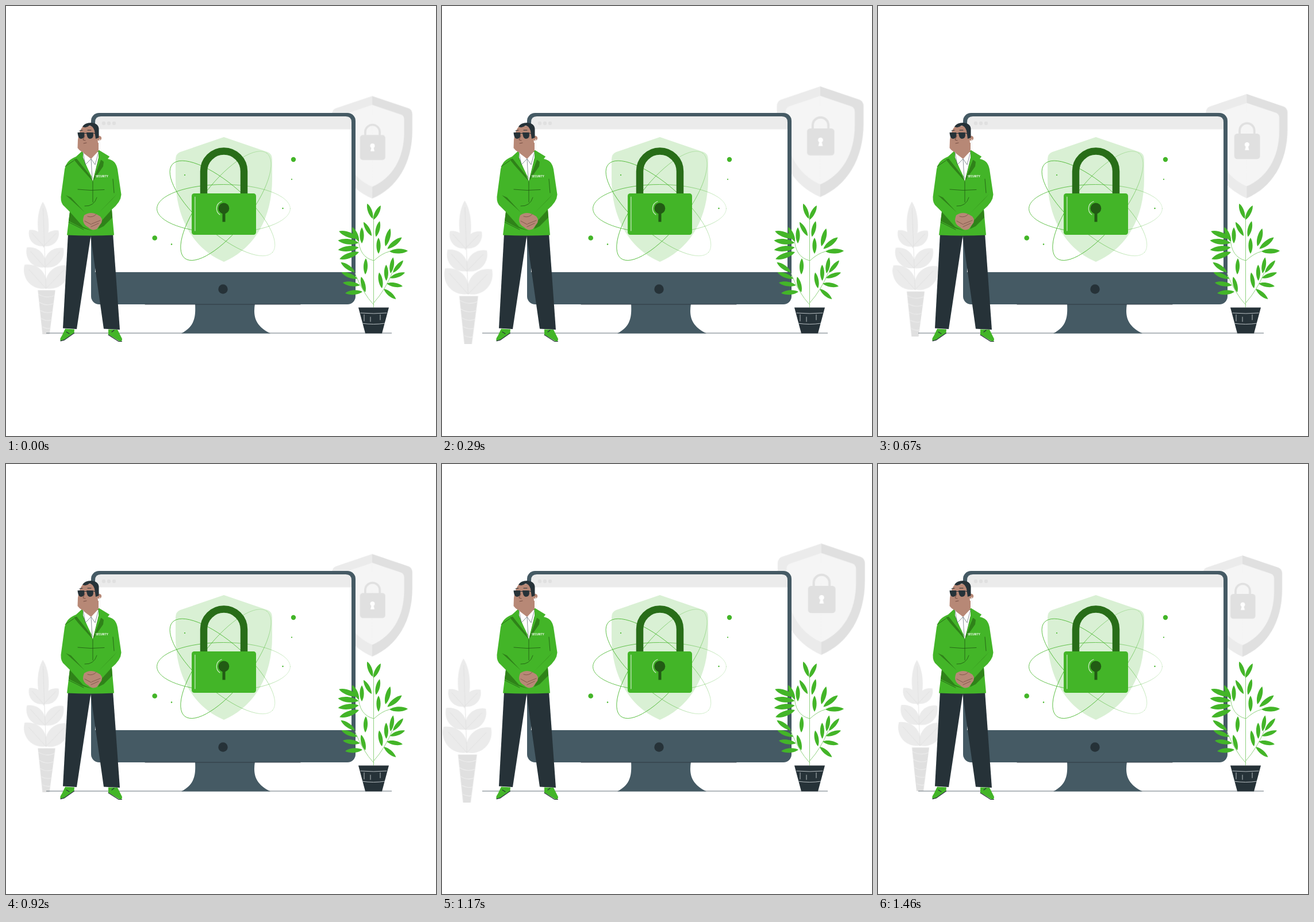
An HTML page for the animation above (1500 ms loop, 748 by 748 pixels).

```html
<!DOCTYPE html>
<html lang="en">
<head>
<meta charset="utf-8">
<title>Security guard</title>
<style>
  html, body { margin: 0; width: 100%; height: 100%; overflow: hidden; background: #fff; }
  svg { display: block; width: 100vw; height: 100vh; }
  .backdrop {
    transform-origin: 374px 368px;
    animation: heartbeat 1.5s -4ms infinite;
  }
  /* Two beats on a grid of 36 steps */
  @keyframes heartbeat {
    0%       { transform: scale(1.0115); animation-timing-function: steps(6); }
    16.6667% { transform: scale(1.099);  animation-timing-function: steps(14); }
    55.5556% { transform: scale(1);      animation-timing-function: steps(1); }
    58.3333% { transform: scale(1);      animation-timing-function: steps(1); }
    61.1111% { transform: scale(1.0115); animation-timing-function: steps(6); }
    77.7778% { transform: scale(1.099);  animation-timing-function: steps(7); }
    97.2222% { transform: scale(1);      animation-timing-function: steps(1); }
    100%     { transform: scale(1.0115); }
  }
  .green { fill: #43b528; }
  .deep { fill: #2f8219; }
  .dark { fill: #263238; }
  .slate { fill: #455a64; }
  .skin { fill: #b78876; }
  .pale { fill: #ebebeb; }
  .grey { fill: #e0e0e0; }
  .line { fill: none; stroke-linecap: round; stroke-linejoin: round; }
</style>
</head>
<body>
<svg viewBox="0 0 748 748">
  <defs>
    <linearGradient id="fade">
      <stop offset=".45" stop-color="#43b528"/>
      <stop offset="1" stop-color="#43b528" stop-opacity=".25"/>
    </linearGradient>
    <path id="half" d="M0 0L76 26Q84 29 84 39V72C84 144 51 195 0 217Z"/>
    <g id="shield"><use href="#half"/><use href="#half" transform="scale(-1 1)"/></g>
    <ellipse id="orbit" rx="116" ry="42"/>
  </defs>

  <g class="backdrop">
    <g transform="translate(634 159) scale(.822 .812)">
      <use href="#half" class="pale" transform="scale(-1 1)"/>
      <use href="#half" class="grey"/>
    </g>
    <use href="#shield" fill="#f5f5f5" transform="translate(634 174) scale(.655 .65)"/>
    <rect class="grey" x="613" y="226" width="43.5" height="43" rx="5"/>
    <path class="line" stroke="#e0e0e0" stroke-width="3.6" d="M622 228V221a12.5 12.5 0 0 1 25 0V228"/>
    <circle cx="634.5" cy="244.5" r="4" fill="#fff"/>
    <path fill="#fff" d="M633 246H636L638 254H631Z"/>

    <path id="fern" class="pale"/>
    <path class="grey" d="M59 493H89L79 569H67Z"/>
    <path id="veins" class="line" stroke="#e0e0e0" stroke-width=".8"/>
    <path id="ridges" class="line" stroke="#efefef"/>
  </g>

  <rect x="70" y="568.5" width="601" height="1" fill="#66737a"/>

  <!-- Monitor -->
  <path class="slate" d="M329 518C330 540 329 557 305 569.5H460C432 556 430 538 433 518Z"/>
  <rect class="slate" x="148" y="186" width="460" height="333" rx="14"/>
  <path class="line" stroke="#263238" stroke-width=".8" d="M242 519H512"/>
  <path fill="#fff" d="M155 214H601V463H155Z"/>
  <path class="pale" d="M155 214.500V202Q155 192 165 192H591Q601 192 601 202V214.500Z"/>
  <path class="line" stroke="#e0e0e0" stroke-width="6.4" stroke-dasharray="0 9" d="M170 204H188.500"/>
  <circle class="dark" cx="377.5" cy="492.5" r="8.2"/>

  <!-- Padlock -->
  <use href="#shield" fill="#d9f0d4" transform="translate(379 228)"/>
  <g class="line" stroke="url(#fade)" stroke-width=".8">
    <use href="#orbit" transform="translate(378.5 352.5)"/>
    <use href="#orbit" transform="translate(376.5 352) rotate(41.3)"/>
    <use href="#orbit" transform="translate(382.5 347.5) rotate(-52)"/>
  </g>
  <path class="line" stroke="#286d18" stroke-width="12.5" d="M344 330V287.500a35 35 0 0 1 70 0V330"/>
  <rect class="green" x="323" y="326" width="112" height="72" rx="4.5"/>
  <path class="line" stroke="#d0ecc9" stroke-width="1.2" d="M328.800 332V391"/>
  <path class="line" stroke="#d0ecc9" stroke-width="1.2" d="M375 340A13 13 0 0 0 372 363"/>
  <circle cx="378.9" cy="352" r="9.4" fill="#225b14"/>
  <path fill="#225b14" d="M376.500 358H381.500V375.500H376.500Z"/>
  <g class="green">
    <circle cx="500" cy="267" r="4.2"/><circle cx="258.7" cy="403.5" r="4.3"/>
    <circle cx="497" cy="301.5" r="1.1"/><circle cx="481.5" cy="352" r="1.2"/>
    <circle cx="288" cy="414.5" r="1.2"/><circle cx="311" cy="294" r="1.1"/>
  </g>

  <!-- Potted plant -->
  <path class="line" stroke="#8fd17f" d="M639.500 524V370M613 404Q614 437 640 443Q654 430 667 427M607 465Q621 500 639 519M672 464Q659 495 640 516"/>
  <path id="leaves" class="green"/>
  <path class="dark" d="M613 524.500H666L654 569.500H625Z"/>
  <path class="line" stroke="#dfe5e7" stroke-width=".8" d="M617 534Q640 536 662 534M619 552Q640 555 659 552M623 537V548M634 541V549M651 537V546"/>

  <!-- Guard -->
  <path class="dark" d="M108 396H148L123 562L99 560.500Z"/>
  <path class="dark" d="M146.500 396H186L198 563L170 561.500Z"/>
  <path class="green" d="M103 561.500L119 562.500L118.500 568.500L101 581L95 582.500Q93 579 97 574Z"/>
  <path class="green" d="M178 562.500L194 563L202 579Q202 584 198 583.500L178 571.500Z"/>
  <path class="line" stroke="#263238" stroke-width="1.2" d="M95 582.700L101 581.200L118.500 569M178 572L196 583.500H201.500M105 567L110 570M184 567L188 564"/>

  <path class="green" d="M133 252L122 262Q105 268 102 284L95.500 332Q95 344 102 349L111 358L106 398.500Q147 400.500 188 398.500L184 354Q200 341 200.500 328L194 284Q191 268 177 266L180 262L162 251Z"/>
  <path fill="#fff" d="M134 254H161L161 270L151 305L134 264Z"/>
  <path class="skin" d="M136 238H161V252L148 266L135 256Z"/>
  <path class="deep" d="M133 262L151 305L126 277L118 267Z"/>
  <path class="deep" d="M161 264L170 271L169 279L151 305Z"/>
  <path class="green" d="M133 252L121 263L151 301L133 264Z"/>
  <path class="green" d="M162 251L180 262L165 268L153 299L161 266Z"/>
  <path class="line" stroke="#53626a" stroke-width=".7" d="M134 255L138 276L148 266L155 276L161 254M148 266L150 301"/>
  <path class="deep" d="M111 358L134 384L150 391L132 386L109 374Z"/>
  <path class="deep" d="M184 354L166 374L160 388L170 383L185 368Z"/>
  <path class="deep" d="M104 329L113 333L137 359Z"/>
  <path class="deep" d="M193 327L185 336L160 361Z"/>
  <path class="line" stroke="#1f5712" stroke-width=".8" d="M151 305V341M125 319Q148 322 171 319.500M137 348Q153 349 158 333M109 376L135 389M118 269L103 279M186 301L188 325"/>
  <path class="skin" d="M136 364Q146 357 157 362L164 366Q170 373 164 380L158 388Q150 392 143 385Q130 378 136 364Z"/>
  <path class="line" stroke="#744e43" stroke-width=".8" d="M142 366Q151 369 157 362M164 373L149 379M161 378L148 384M137 374L148 380"/>
  <text x="156" y="297.700" fill="#fff" font-family="Inter, Arial, sans-serif" font-size="4.3" font-weight="700">SECURITY</text>

  <path class="skin" d="M134 209Q127 217 125 233L124.500 247Q132 258 149 256Q158 252 160 238L157 208Z"/>
  <circle class="skin" cx="162" cy="230" r="4.2"/>
  <path class="dark" d="M133 210Q137 203 148 203Q161 204 161.500 214V229L156 231L154 217Q151 208 145 208Q139 213 133 210Z"/>
  <path id="lens" class="dark" d="M124.500 220H136Q138 231 130 231Q125 230 124.500 220Z"/>
  <use href="#lens" x="15.5"/>
  <path class="line" stroke="#263238" d="M134 221.500H142M152 221L161 224M128 217L133 216M142 216H148"/>
  <path class="line" stroke="#6d473d" stroke-width=".9" d="M137 226L134 233L138 234M135 239L140 238"/>
  <path class="line" stroke="#f2f2f2" stroke-width="1.3" d="M163 232V248"/>
</svg>
<script>
  const draw = (id, parts) => document.getElementById(id).setAttribute("d", parts.join(""));
  const mix = (a, b, t) => a + (b - a) * t;

  // Point at a distance along a heading (degrees clockwise from up) and sideways
  function place(x, y, heading, along, side = 0) {
    const r = heading * Math.PI / 180, s = Math.sin(r), c = Math.cos(r);
    return `${(x + along * s + side * c).toFixed(1)} ${(y - along * c + side * s).toFixed(1)}`;
  }

  function leaf(x, y, heading, size, width = .17) {
    const at = (a, s) => place(x, y, heading, a * size, s * size);
    return `M${x} ${y}C${at(.25, width)} ${at(.75, width)} ${at(1, 0)}` +
           `C${at(.75, -width)} ${at(.25, -width)} ${x} ${y}Z`;
  }

  // Leaves spaced along a twig, turning from one heading to another
  function fan(count, x0, y0, x1, y1, from, to, size = 28) {
    return Array.from({ length: count }, (_, i) => {
      const t = i / (count - 1);
      return leaf(mix(x0, x1, t), mix(y0, y1, t), mix(from, to, t), size);
    }).join("");
  }

  draw("leaves", [
    fan(2, 638, 370, 636, 400, -20, -30),
    fan(3, 639, 372, 648, 431, 27, 0),
    fan(4, 613, 404, 614, 428, -70, -110, 36),
    fan(2, 614, 410, 619, 413, -25, 0),
    fan(3, 660, 418, 667, 427, 15, 88, 32),
    fan(4, 607, 463, 620, 497, -55, -95, 30),
    fan(2, 625, 467, 625, 498, 2, -15),
    fan(3, 669, 465, 654, 491, 9, -10),
    fan(4, 673, 464, 657, 492, 40, 130)
  ]);

  // Grey fern: a tall crown over three widening pairs of lobes
  const fern = [leaf(69, 420, -1, 79, .16)], veins = ["M68 352L73 490"];
  for (let i = 0; i < 3; i++) {
    const x = 69 + 2 * i, y = 417 + 36.5 * i, size = 37 + 9 * i;
    for (const heading of [-42, 44]) {
      fern.push(leaf(x, y, heading, size, .37));
      veins.push(`M${x} ${y}L${place(x, y, heading, size * .8)}`);
    }
  }
  draw("fern", fern);
  draw("veins", veins);
  draw("ridges", Array.from({ length: 5 }, (_, i) =>
    `M${60 + 1.8 * i} ${500 + 14 * i}Q74 ${508 + 13 * i} ${88 - 1.8 * i} ${502 + 14 * i}`));
</script>
</body>
</html>
```
